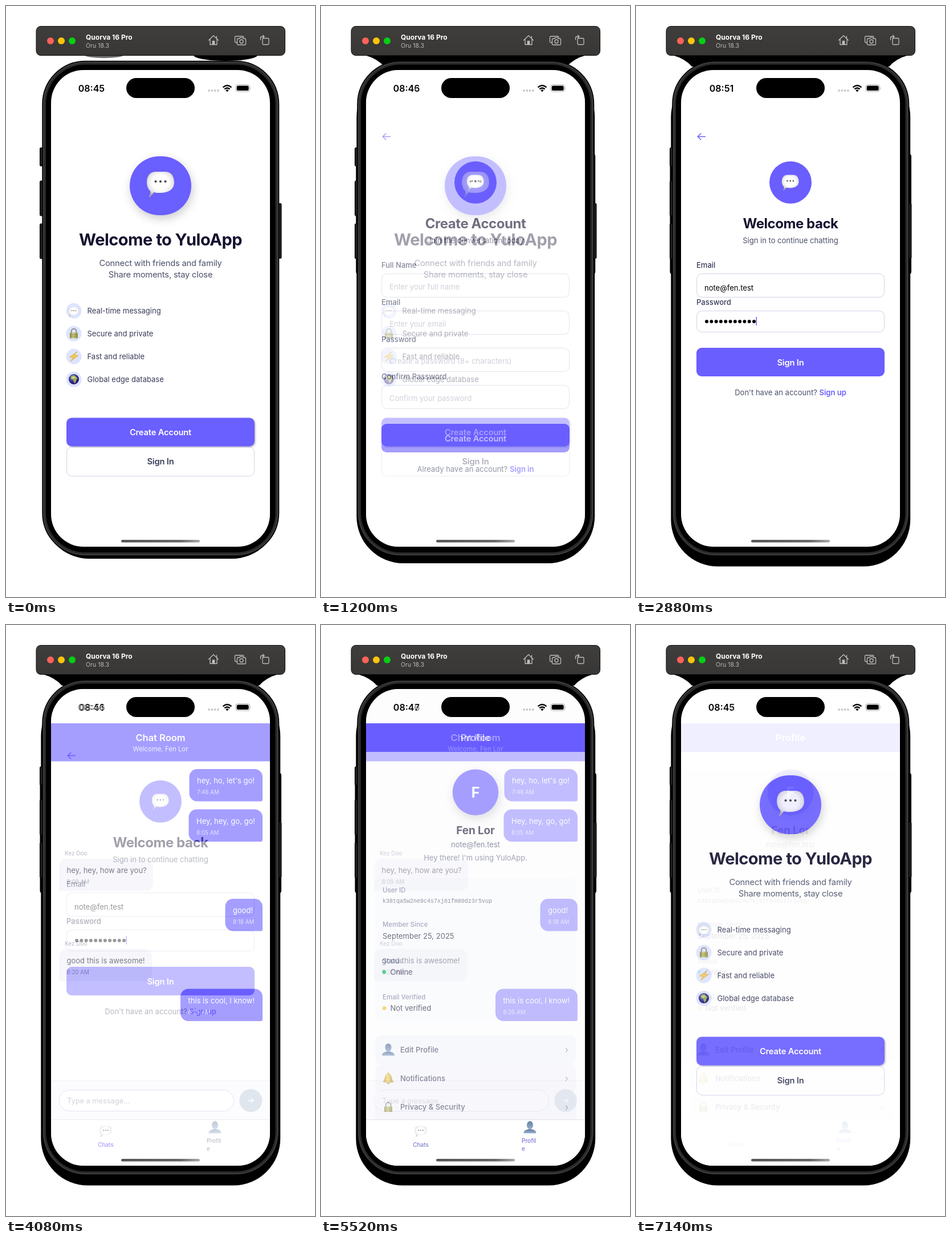
These frames come from a looping animation (542 by 1034 pixels, 7.2 s). An HTML page:

```html
<!DOCTYPE html>
<html lang="en">
<head>
<meta charset="utf-8">
<title>Chat app tour</title>
<style>
  html, body { margin: 0; width: 100%; height: 100%; overflow: hidden; background: #fff; }
  svg { display: block; width: 100%; height: 100%; }
  text { font-family: Inter, "Open Sans", sans-serif; font-optical-sizing: none; white-space: pre; }
  .mono { font-family: "Liberation Mono", monospace; }
</style>
</head>
<body>
<svg id="stage" viewBox="0 0 542 1034">
  <defs>
    <clipPath id="display"><rect x="79" y="112" width="384" height="834" rx="57"/></clipPath>
    <linearGradient id="bar" x2="0" y2="1"><stop stop-color="#3f3e3c"/><stop offset="1" stop-color="#383735"/></linearGradient>
    <linearGradient id="pill"><stop stop-color="#555"/><stop offset=".75" stop-color="#666"/><stop offset="1" stop-color="#aaa"/></linearGradient>
    <radialGradient id="cloud" cy=".42" r=".58"><stop offset=".5" stop-color="#fff"/><stop offset=".8" stop-color="#e6e6e6"/><stop offset="1" stop-color="#a9a9a9"/></radialGradient>
    <linearGradient id="steel" x2="0" y2="1"><stop stop-color="#46658c"/><stop offset="1" stop-color="#7f9cc4"/></linearGradient>
    <linearGradient id="gold"><stop stop-color="#b98a1c"/><stop offset=".45" stop-color="#f3d264"/><stop offset="1" stop-color="#a97a12"/></linearGradient>
    <linearGradient id="brass"><stop stop-color="#84844a"/><stop offset=".4" stop-color="#cfcb83"/><stop offset="1" stop-color="#8d8b45"/></linearGradient>
    <radialGradient id="ocean" cx=".4" cy=".35"><stop stop-color="#6a7cf0"/><stop offset="1" stop-color="#261a78"/></radialGradient>
    <filter id="lift" x="-50%" y="-50%" width="200%" height="200%"><feDropShadow dy="6" stdDeviation="8" flood-color="#000" flood-opacity=".2"/></filter>
    <filter id="low" x="-5%" y="-20%" width="110%" height="150%"><feDropShadow dy="1.5" stdDeviation="1.3" flood-color="#223" flood-opacity=".25"/></filter>

    <g id="balloon">
      <path fill="url(#cloud)" d="M-24 2C-24-12-17-17-8-17H8C17-17 24-12 24 2C24 15 12 20-1 20C-6 20-10 19.5-12 19C-14 23-18 27-21 27.5C-19 25-17.5 21-18 17C-22 13-24 8-24 2Z"/>
      <g fill="#484848"><circle cx="-8.5" r="2.1"/><circle r="2.1"/><circle cx="8.5" r="2.1"/></g>
    </g>
    <g id="lock">
      <path d="M-4.3 0V-4A4.3 4.3 0 0 1 4.3-4V0" fill="none" stroke="#8f938c" stroke-width="2"/>
      <rect x="-7" y="-1.5" width="14" height="10" rx="1.5" fill="url(#brass)"/>
      <path d="M-6.5 2H6.5M-6.5 5H6.5" stroke="#77753c" stroke-width=".5"/>
    </g>
    <path id="bolt" d="M5.5-8L-7.5 1.3L-.6 1.6L-5.5 8.5L7.5-1.3L.6-1.6Z" fill="#f6cd50" stroke="#d5972c" stroke-width=".7"/>
    <g id="globe">
      <circle r="9" fill="url(#ocean)"/>
      <path d="M-5.5-4.5Q-2-8 2-6.5L5-3L7-2L4.5 1L3.5 5L1 7.5L-.5 3L-1.5 .5L-5 0Z" fill="#97ad55"/>
      <path d="M-4-3.5Q0-6 3.5-3L1-1.5L-3-1Z" fill="#ddd08a"/>
    </g>
    <g id="bust" fill="url(#steel)">
      <path d="M-11 10.5C-11 4.5-6 5-3 3.2H3C6 5 11 4.5 11 10.5Z"/>
      <ellipse cy="-3.7" rx="5.5" ry="7"/>
    </g>
    <g id="bell">
      <circle cy="7.2" r="2.3" fill="#8e6713"/>
      <path d="M-9.5 6.5C-5.5 3-7.5-8 0-8.5C7.5-8 5.5 3 9.5 6.5Q0 9 -9.5 6.5Z" fill="url(#gold)"/>
      <circle cy="-8.7" r="1.5" fill="#c5982c"/>
    </g>
  </defs>

  <g id="shadow">
    <g id="specks"><ellipse cx="385" cy="86" rx="56" ry="10"/><ellipse cx="172" cy="86" rx="34" ry="5" opacity=".6"/></g>
    <path id="wedge"/><rect id="halo" y="112" rx="82"/><rect id="sides" y="258" height="212" rx="5"/>
  </g>

  <g id="toolbar">
    <rect x="53" y="35.5" width="436.5" height="51" rx="8" fill="url(#bar)" stroke="#111"/>
    <circle cx="78" cy="61" r="6" fill="#ff6259"/><circle cx="97" cy="61" r="6" fill="#fec40a"/><circle cx="116" cy="61" r="6" fill="#06cf14"/>
    <text x="140" y="59.3" font-size="12" font-weight="700" fill="#fff">Quorva 16 Pro</text>
    <text x="140" y="72.7" font-size="10.5" fill="#b9b9b7">Oru 18.3</text>
    <g fill="none" stroke="#bdbdbb" stroke-width="1.3" stroke-linejoin="round" stroke-linecap="round">
      <path d="M355.5 60L364 51.8L372.5 60M358 58V67.5H370V58M369.5 56.5V53"/><path d="M362.3 67V61.5H365.7V67Z" fill="#bdbdbb"/>
      <path d="M404.5 64H403Q401.500 64 401.500 62V55Q401.500 53 403 53H415.500Q417 53 417 55"/>
      <path d="M407 57H409.500L411 55.300H415L416.500 57H419Q420.500 57 420.500 58.500V66.500Q420.500 68 419 68H407Q405.500 68 405.500 66.500V58.500Q405.500 57 407 57Z"/><circle cx="413" cy="62" r="3"/>
      <rect x="450" y="56.500" width="11" height="11" rx="1.500"/><path d="M446.500 59V56Q446.500 53.500 449.500 53.500H453M450.700 51.200L453 53.500L450.700 55.800"/>
    </g>
  </g>

  <g id="device">
    <g fill="#202020" stroke="#000">
      <rect x="59.500" y="248" width="8" height="32" rx="1.500"/><rect x="59.500" y="306" width="8" height="61" rx="1.500"/>
      <rect x="59.500" y="381" width="8" height="61" rx="1.500"/><rect x="475" y="345.500" width="8" height="96" rx="1.500"/>
    </g>
    <rect x="64" y="96.500" width="414.500" height="865.500" rx="75" fill="#2a2a2a" stroke="#000" stroke-width="1.500"/>
    <rect x="66" y="98.500" width="410.500" height="861.500" rx="73" fill="none" stroke="#4a4a4a"/>
    <rect x="70" y="102.500" width="402.500" height="853.500" rx="69"/>
  </g>

  <g id="screens" clip-path="url(#display)"></g>

  <rect x="211" y="126" width="120" height="35" rx="17.500"/>
  <g fill="#c9c9c9"><circle cx="356" cy="148" r="1.900"/><circle cx="361.300" cy="148" r="1.900"/><circle cx="366.600" cy="148" r="1.900"/><circle cx="371.900" cy="148" r="1.900"/></g>
  <g fill="none" stroke="#000" stroke-width="2.300"><path d="M380.500 142.300Q388 135.800 395.500 142.300M383.300 145.400Q388 141.500 392.700 145.400"/></g>
  <path d="M385.300 147.400Q388 145.200 390.700 147.400L388 150.300Z"/>
  <rect x="403" y="137.800" width="24.500" height="12" rx="3.800" fill="none" stroke="#a5a5a5"/><rect x="404.700" y="139.500" width="21" height="8.600" rx="2.500"/>
  <path d="M428.700 142V146Q430 144 428.700 142Z" fill="#aaa"/>
  <rect x="202" y="934" width="138" height="4.600" rx="2.300" fill="url(#pill)"/>
</svg>

<script>
const PURPLE = '#6a5eff', INK = '#14122f', BODY = '#4b5069', LABEL = '#383b58', FAINT = '#b3b5c3', MUTED = '#8a8fa5';
const $ = id => document.getElementById(id);

const text = (x, y, size, str, fill = BODY, weight = 400, extra = '') =>
  `<text x="${x}" y="${y}" font-size="${size}" fill="${fill}" font-weight="${weight}" ${extra}>${str}</text>`;
const centred = (y, size, str, fill, weight, spacing = 0, x = 271) =>
  text(x, y, size, str, fill, weight, `text-anchor="middle" letter-spacing="${spacing}em"`);
const box = (x, y, w, h, fill, rx = 0, extra = '') =>
  `<rect x="${x}" y="${y}" width="${w}" height="${h}" rx="${rx}" fill="${fill}" ${extra}/>`;
const disc = (x, y, r, fill, extra = '') => `<circle cx="${x}" cy="${y}" r="${r}" fill="${fill}" ${extra}/>`;
const icon = (name, x, y, scale = 1, opacity = 1) =>
  `<use href="#${name}" transform="translate(${x} ${y}) scale(${scale})" opacity="${opacity}"/>`;
const outline = (y, h, rx = 9, x = 106, w = 330) => box(x + .5, y + .5, w - 1, h - 1, '#fff', rx, 'stroke="#d3d3e6"');

const button = (y, str) => box(106, y, 330, 50, PURPLE, 9) + centred(y + 30.5, 14.7, str, '#fff', 600, -.012);
const page = (time, content, background = '#fff') =>
  box(79, 112, 384, 834, background) + centred(149.7, 16, time, '#000', 600, 0, 150) + content;

const authHead = (title, subtitle) =>
  `<path d="M122 228.5H108.500M114.200 222.700L108.300 228.500L114.200 234.300" fill="none" stroke="${PURPLE}" stroke-width="1.500"/>` +
  disc(271, 308.700, 37, PURPLE) + icon('balloon', 270.700, 306, .62) +
  centred(389, 24, title, INK, 700, -.019) + centred(415, 13, subtitle);
const field = (y, label, placeholder = '', h = 42) =>
  text(106, y - 10, 13, label, LABEL, 500) + outline(y, h) + text(120, y + 27.700, 13, placeholder, FAINT);
const footer = (y, question, link) =>
  centred(y, 13, `${question} <tspan fill="${PURPLE}" font-weight="600">${link}</tspan>`);

const bubble = (x, y, message, time, mine) => {
  const w = (mine ? 450 : x) - (mine ? x : 93), left = mine ? x : 93;
  const [br, bl] = mine ? [3, 14] : [14, 3];
  const shape = `M${left + 14} ${y}h${w - 28}a14 14 0 0 1 14 14v${42.500 - br}a${br} ${br} 0 0 1 ${-br} ${br}h${br + bl - w}a${bl} ${bl} 0 0 1 ${-bl} ${-bl}v${bl - 42.500}a14 14 0 0 1 14 -14Z`;
  return (mine ? '' : text(103, y - 6, 10, 'Kez Doo', MUTED)) +
    `<path d="${shape}" fill="${mine ? PURPLE : '#f2f3f9'}"/>` +
    text(left + 13.500, y + 25, 13, message, mine ? '#fff' : '#22253c') +
    text(left + 13.500, y + 44.300, 9.800, time, mine ? '#d5d1ff' : MUTED);
};

const tabs = active => {
  const colour = i => i === active ? PURPLE : '#9297ab', fade = i => i === active ? 1 : .55;
  return box(79, 865.500, 384, 81, '#fff') + box(79, 865, 384, 1, '#e0e1ea') +
    icon('balloon', 175, 884, .44, fade(0)) + centred(912.700, 10, 'Chats', colour(0), 500, 0, 175) +
    icon('bust', 366.500, 878.700, 1, fade(1)) + text(352, 905.700, 10, 'Profil', colour(1), 500) + text(352, 919.500, 10, 'e', colour(1), 500);
};
const header = (h, title) => box(79, 172, 384, h, PURPLE) + centred(203, 16.500, title, '#fff', 600);
const detail = (y, label, value, dot) =>
  text(108, y, 11.500, label, '#70759a', 500) +
  (dot ? disc(111, y + 15.300, 3.400, dot) : '') + text(dot ? 121.500 : 108, y + 20.300, 13, value, INK);
const menuRow = (y, name, label) =>
  box(95, y, 352, 50.500, '#f3f4fb', 10) + icon(name, 118, y + 25) + text(139, y + 29.800, 13, label, LABEL, 500) +
  `<path d="M429.300 ${y + 22}l3 3.700l-3 3.700" fill="none" stroke="${MUTED}" stroke-width="1.200"/>`;

const features = [['balloon', 'Real-time messaging', .4], ['lock', 'Secure and private'], ['bolt', 'Fast and reliable'], ['globe', 'Global edge database']];

const welcome = page('08:45',
  box(217, 263, 108, 103, PURPLE, 51.500, 'filter="url(#lift)"') + icon('balloon', 271, 307) +
  centred(419, 29, 'Welcome to YuloApp', INK, 700, -.018) +
  centred(455, 14.700, 'Connect with friends and family', BODY, 400, -.012) +
  centred(475, 14.700, 'Share moments, stay close', BODY, 400, -.012) +
  features.map(([name, label, scale], i) => {
    const y = 533 + 40 * i;
    return disc(119, y + .3, 13.500, '#dde4ff') + icon(name, 119, y, scale) + text(142.500, y + 5, 13, label, LABEL);
  }).join('') +
  outline(771, 52) + centred(802, 14.700, 'Sign In', LABEL, 600, -.012) +
  `<g filter="url(#low)">${button(720.500, 'Create Account')}</g>`);

const signUp = page('08:46',
  authHead('Create Account', 'Join the conversation today') +
  [['Full Name', 'Enter your full name'], ['Email', 'Enter your email'],
   ['Password', 'Create a password (8+ characters)'], ['Confirm Password', 'Confirm your password']]
    .map(([label, hint], i) => field(468 + 65 * i, label, hint)).join('') +
  button(731, 'Create Account') + footer(814.500, 'Already have an account?', 'Sign in'));

const signIn = page('08:51',
  authHead('Welcome back', 'Sign in to continue chatting') +
  field(468, 'Email') + text(120, 498, 13, 'note@fen.test', '#000') +
  field(533, 'Password', '', 38) +
  Array.from({ length: 11 }, (_, i) => disc(124 + 8.300 * i, 552, 3, '#000')).join('') + box(210.500, 544, 1.500, 15, PURPLE) +
  button(598, 'Sign In') + footer(681, "Don't have an account?", 'Sign up'));

const chat = page('08:46',
  header(66.500, 'Chat Room') + centred(221, 11.400, 'Welcome, Fen Lor', '#e9e7ff') +
  bubble(321.500, 252, "hey, ho, let's go!", '7:46 AM', true) +
  bubble(320.500, 322.500, 'Hey, hey, go, go!', '8:05 AM', true) +
  bubble(258, 409, 'hey, hey, how are you?', '8:09 AM') +
  bubble(384.500, 479, 'good!', '8:18 AM', true) +
  bubble(256, 566.500, 'good this is awesome!', '8:20 AM') +
  bubble(306, 636.500, 'this is cool, I know!', '8:25 AM', true) +
  box(79, 797, 384, 69, '#fafbfd') + box(79, 797, 384, 1, '#e2e4ed') + outline(813, 38, 19, 92.500, 307.500) +
  text(107, 836.800, 12.800, 'Type a message...', FAINT) + disc(429.300, 832, 20, '#cbd5e1') +
  '<path d="M424 832H434M430 828L434 832L430 836" fill="none" stroke="#fff" stroke-width="1.300"/>' + tabs(0));

const profile = page('08:47',
  header(50, 'Profile') +
  disc(271, 292.700, 40.300, PURPLE, 'filter="url(#lift)"') + centred(301.800, 25, 'F', '#fff', 700) +
  centred(366, 19, 'Fen Lor', INK, 700, -.008) + centred(388.500, 13, 'note@fen.test') +
  centred(411.500, 13, "Hey there! I'm using YuloApp.", '#666b84') +
  box(95, 443, 352, 248, '#f8f9fc', 10) +
  text(108, 468.300, 11.500, 'User ID', '#70759a', 500) +
  text(108, 485.700, 10, 'k38tqa5w2ne9c4s7xj61fm80dz3r5vup', BODY, 400, 'class="mono"') +
  detail(528.300, 'Member Since', 'September 25, 2025') +
  detail(591.700, 'Status', 'Online', '#12cf62') +
  detail(655, 'Email Verified', 'Not verified', '#ecc21c') +
  menuRow(718, 'bust', 'Edit Profile') + menuRow(768.300, 'bell', 'Notifications') + menuRow(818.600, 'lock', 'Privacy &amp; Security') +
  tabs(1), '#fcfcfe');

const screens = [welcome, signUp, signIn, chat, profile].map(content => {
  const group = document.createElementNS('http://www.w3.org/2000/svg', 'g');
  group.innerHTML = content;
  return group;
});

// The cast shadow spreads during the first fade and stays until the loop restarts.
function drawShadow(grow) {
  const inset = 200 * (1 - grow) ** 3;
  const l = 64 + inset, r = 478 - inset;
  $('specks').style.display = grow < 1 ? '' : 'none';
  $('wedge').setAttribute('d', grow ? `M${l} 86Q${l + 22} 92 ${l + 34} 106H${r - 34}Q${r - 22} 92 ${r} 86Z` : '');
  const spread = (id, side) => {
    $(id).setAttribute('x', 64 - side);
    $(id).setAttribute('width', 414.500 + 2 * side);
  };
  spread('halo', 2.700 * grow);
  spread('sides', 4.500 * grow);
  $('halo').setAttribute('height', 855 + 13.500 * grow);
}

const HOLD = 900, STEP = 60, SLOT = 1440;
let shown = '';
function draw() {
  const time = performance.now() % (SLOT * screens.length);
  const slot = Math.floor(time / SLOT);
  const fade = Math.max(0, Math.floor((time % SLOT - HOLD) / STEP) + 1) / 10;
  const state = slot + ':' + fade;
  if (state !== shown) {
    shown = state;
    const next = screens[(slot + 1) % screens.length];
    screens[slot].setAttribute('opacity', 1);
    next.setAttribute('opacity', fade);
    $('screens').replaceChildren(screens[slot], ...(fade ? [next] : []));
    drawShadow(slot ? 1 : fade);
  }
  requestAnimationFrame(draw);
}
draw();
</script>
</body>
</html>
```
